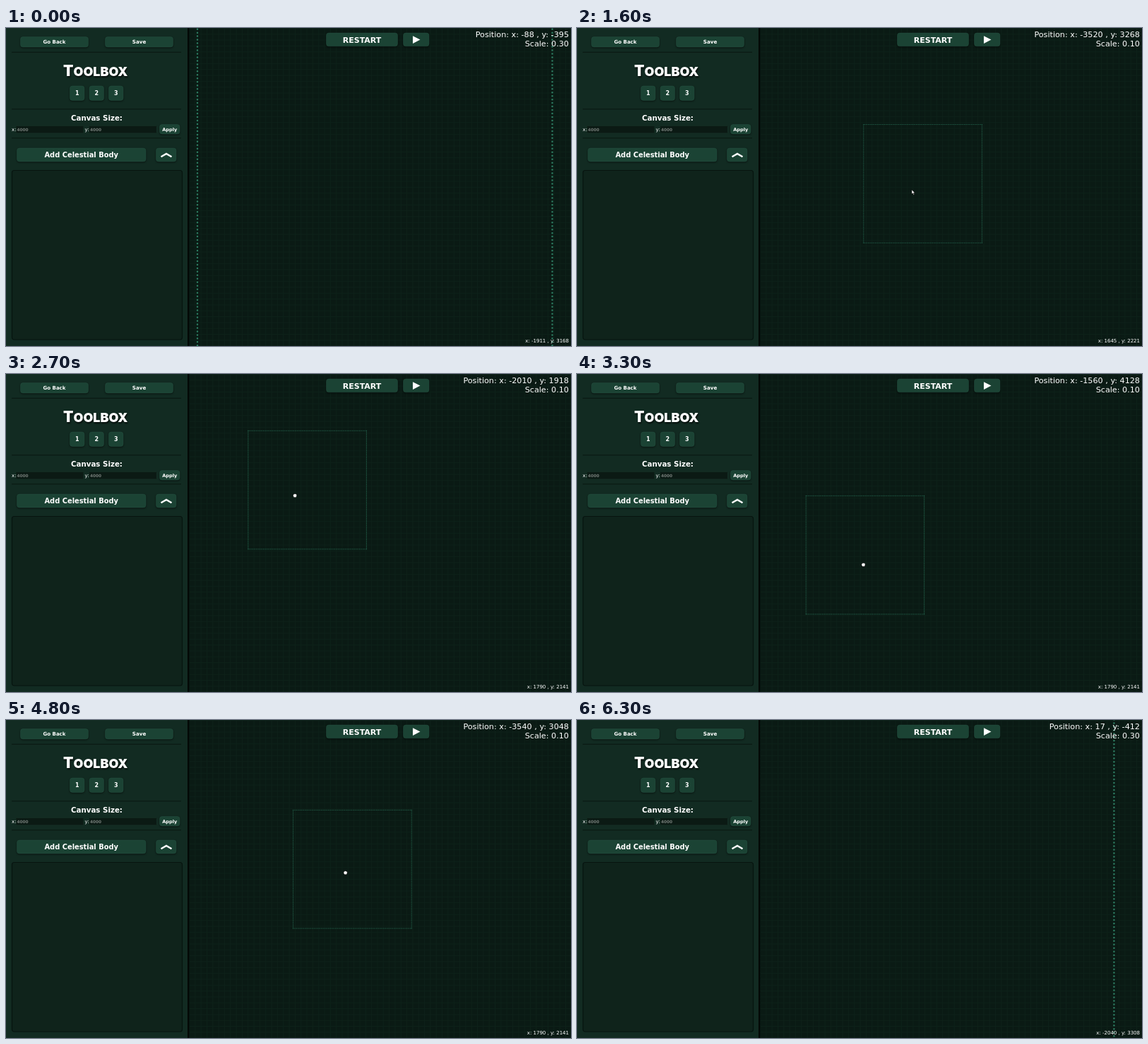
Write an HTML page that moves like this. It is 800 px wide and 450 px high and loops after 7.6 s.

```html
<!DOCTYPE html>
<html lang="en">
<head>
<meta charset="utf-8">
<title>Toolbox</title>
<style>
  html, body { margin: 0; width: 100%; height: 100%; overflow: hidden; background: #0a1a14; }
  #stage { position: relative; width: 800px; height: 450px; overflow: hidden; background: #0a1a14; }
  #grid {
    position: absolute; inset: 0 0 0 259px;
    background-image:
      linear-gradient(90deg, #0d2119 1px, transparent 1px),
      linear-gradient(#0d2119 1px, transparent 1px);
    background-size: 8.333px 8.333px;
  }
  #world {
    position: absolute; left: 0; top: 0; width: 4000px; height: 4000px;
    border: 20px dotted #2d7d62; transform-origin: 0 0;
  }
  svg { position: absolute; left: 0; top: 0; }
  text { font-family: "DejaVu Sans", sans-serif; fill: #fff; }
  .mid { text-anchor: middle; font-weight: bold; }
  .end { text-anchor: end; }
  .title { font-family: Inter, sans-serif; font-weight: 900; text-shadow: 1px 2px 2px #000a; }
  .btn rect { fill: #1b4334; stroke: #28584680; stroke-width: .8; filter: drop-shadow(0 1.2px 1px #0009); }
  .field { fill: #0b1a14; stroke: #1a362b; stroke-width: .6; }
  .hint { font-size: 5.8px; font-weight: bold; fill: #757d79; }
  .rule { stroke: #091711; stroke-width: 1; }
  .cursor { fill: #fff; stroke: #000; stroke-width: .6; stroke-linejoin: round; }
</style>
</head>
<body>
<div id="stage">
  <div id="grid"></div>
  <div id="world"></div>
  <svg width="800" height="450" viewBox="0 0 800 450">
    <rect width="257" height="450" fill="#122b22"/>
    <rect x="257" width="2.5" height="450" fill="#030906"/>
    <path class="rule" d="M8 34.3H248M8 114.8H248M8 155.8H248"/>
    <rect x="8.5" y="201.5" width="241" height="239.5" rx="3" fill="#0f231b" stroke="#07140f" stroke-width="1.2"/>
    <g id="buttons"></g>
    <text class="title" x="81" y="67.5" font-size="21">T<tspan font-size="18">OOLBOX</tspan></text>
    <text class="mid" x="128.5" y="131" font-size="10.25">Canvas Size:</text>
    <rect class="field" x="14" y="138.3" width="96" height="10.6" rx="1"/>
    <rect class="field" x="117.5" y="138.3" width="96" height="10.6" rx="1"/>
    <text x="8" y="146" font-size="7">x:</text>
    <text x="111.5" y="146" font-size="7">y:</text>
    <text class="hint" x="15.5" y="145.8">4000</text>
    <text class="hint" x="119" y="145.8">4000</text>
    <path d="M219.5 182.2L227 178L234.5 182.2" fill="none" stroke="#fff" stroke-width="2.4"/>
    <path d="M576 11.2L586.5 16.6L576 22Z" fill="#fff"/>
    <text id="place" class="end" x="797" y="13.4" font-size="11.2"></text>
    <text id="zoom" class="end" x="797" y="25.8" font-size="11.2"></text>
    <text id="mouse" class="end" x="797" y="445.2" font-size="7"></text>
    <g id="pointer">
      <path id="arrow" class="cursor" d="M0 0V6.4L1.5 5.1L2.6 7.5L3.7 7L2.6 4.7H4.6Z"/>
      <path id="hand" class="cursor" d="M-2.3 -1.2Q-1.8 -2.7 -.9 -2.3Q0 -3 .7 -2.3Q1.8 -2.5 2.4 -1.4Q3 .4 2 1.5L1.7 2.6H-1.3L-2.6 .9Q-3 -.4 -2.3 -1.2Z"/>
    </g>
  </svg>
</div>
<script>
const LOOP = 7600, STEP = 100;
const GRAB = 1800, DROP = 5000;
const LEFT = 258.75;
const $ = id => document.getElementById(id);

// x, y, width, height, label, font size, baseline
const buttons = [
  [20.5, 12.5, 96, 14.5, "Go Back", 7, 22.4],
  [140.5, 12.5, 96, 14.5, "Save", 7.2, 22.4],
  [90.5, 82, 20.5, 20.5, "1", 8, 95],
  [118, 82, 20.5, 20.5, "2", 8, 95],
  [145.5, 82, 20.5, 20.5, "3", 8, 95],
  [217.5, 136.5, 28.5, 13.5, "Apply", 6.6, 145.6],
  [15.5, 170, 182.5, 19, "Add Celestial Body", 9.9, 183.2],
  [212.5, 170, 28.5, 19],
  [453.5, 7, 101, 18.8, "RESTART", 11, 20.5],
  [562.5, 7, 36.5, 18.8]
];
$("buttons").innerHTML = buttons.map(([x, y, w, h, label, size, base]) =>
  `<g class="btn"><rect x="${x}" y="${y}" width="${w}" height="${h}" rx="3.5"/>` +
  (label ? `<text class="mid" x="${x + w / 2}" y="${base}" font-size="${size}">${label}</text>` : "") +
  "</g>").join("");

// Rows of time, x, y
const drag = [
  [1800, -3520, 3268], [2200, -3900, 2100], [2500, -2900, 1560], [2700, -2010, 1918],
  [2950, -1100, 2350], [3300, -1560, 4128], [3450, -2500, 4700], [3700, -4500, 4300],
  [3900, -5240, 3398], [4150, -4700, 2300], [4350, -3200, 2100], [4550, -2850, 2750],
  [4800, -3540, 3048], [4900, -3530, 3048]
];
const enter = [
  [0, 30.875, 346.625], [300, 190, 290], [700, 470, 233], [900, 473.25, 228.9],
  [1500, 473.25, 228.9], [1600, 473.96, 228.71], [1800, 480, 225.4]
];
const leave = [
  [5000, 480.42, 216.21], [5500, 480.42, 216.21], [5700, 330, 265], [5900, 106, 330],
  [6000, 75, 341], [6100, 50, 348], [6200, 31, 354], [6300, 1.67, 362]
];

// Smooth curve through the rows without overshoot
function curve(rows, t, c) {
  const last = rows.length - 1;
  if (t <= rows[0][0]) return rows[0][c];
  if (t >= rows[last][0]) return rows[last][c];
  const i = rows.findIndex(r => r[0] > t) - 1;
  const slope = k => (rows[k + 1][c] - rows[k][c]) / (rows[k + 1][0] - rows[k][0]);
  const tangent = k => {
    if (k === 0 || k === last) return 0;
    const a = slope(k - 1), b = slope(k);
    return a * b > 0 ? 2 * a * b / (a + b) : 0;
  };
  const h = rows[i + 1][0] - rows[i][0], u = (t - rows[i][0]) / h;
  const p = rows[i][c], q = rows[i + 1][c], v = 1 - u;
  return v * v * (1 + 2 * u) * p + u * u * (3 - 2 * u) * q
    + h * u * v * (v * tangent(i) - u * tangent(i + 1));
}
const at = (rows, t) => [curve(rows, t, 1), curve(rows, t, 2)];

function scaleAt(t) {
  const wheel = from => Math.min(4, Math.max(0, Math.floor((t - from) / STEP) + 1));
  return 0.3 - 0.05 * wheel(1000) + 0.05 * wheel(5200);
}

function draw(now) {
  const t = Math.floor((now % LOOP) / STEP) * STEP;
  const scale = scaleAt(t), k = scale / 0.24 * 0.1;
  const held = t >= GRAB && t < DROP;

  // Zooming keeps the world point under the mouse in place
  const [wx, wy] = t < 3000 ? [1628, 2226] : [1790, 2142];
  const [bx, by] = at(drag, t);
  const px = Math.round(bx / 10) * 10, py = Math.round((by - 8) / 10) * 10 + 8;
  const x = wx - (wx - px) * 0.1 / scale;
  const y = (py + wy) * 0.1 / scale - wy;
  const ox = LEFT - x * k, oy = y * k;

  let mx, my, tx = 1790, ty = 2141;
  if (held) {
    const [ax, ay] = at(drag, t + 43);
    mx = LEFT + (tx - ax) / 24;
    my = (ty + ay) / 24;
  } else {
    [mx, my] = at(t < GRAB ? enter : leave, t);
    tx = Math.round((mx - ox) / k);
    ty = Math.round((my - oy) / k);
  }

  $("world").style.transform = `translate(${ox}px, ${oy}px) scale(${k})`;
  $("place").textContent = `Position: x: ${Math.round(x)} , y: ${Math.round(y)}`;
  $("zoom").textContent = `Scale: ${scale.toFixed(2)}`;
  $("mouse").textContent = `x: ${tx} , y: ${ty}`;
  $("pointer").setAttribute("transform", `translate(${mx} ${my})`);
  $("pointer").style.display = t >= 100 && t < 6300 ? "" : "none";
  $("arrow").style.display = held ? "none" : "";
  $("hand").style.display = held ? "" : "none";
}

const start = performance.now();
function tick() {
  draw(performance.now() - start);
  requestAnimationFrame(tick);
}
tick();
</script>
</body>
</html>
```
